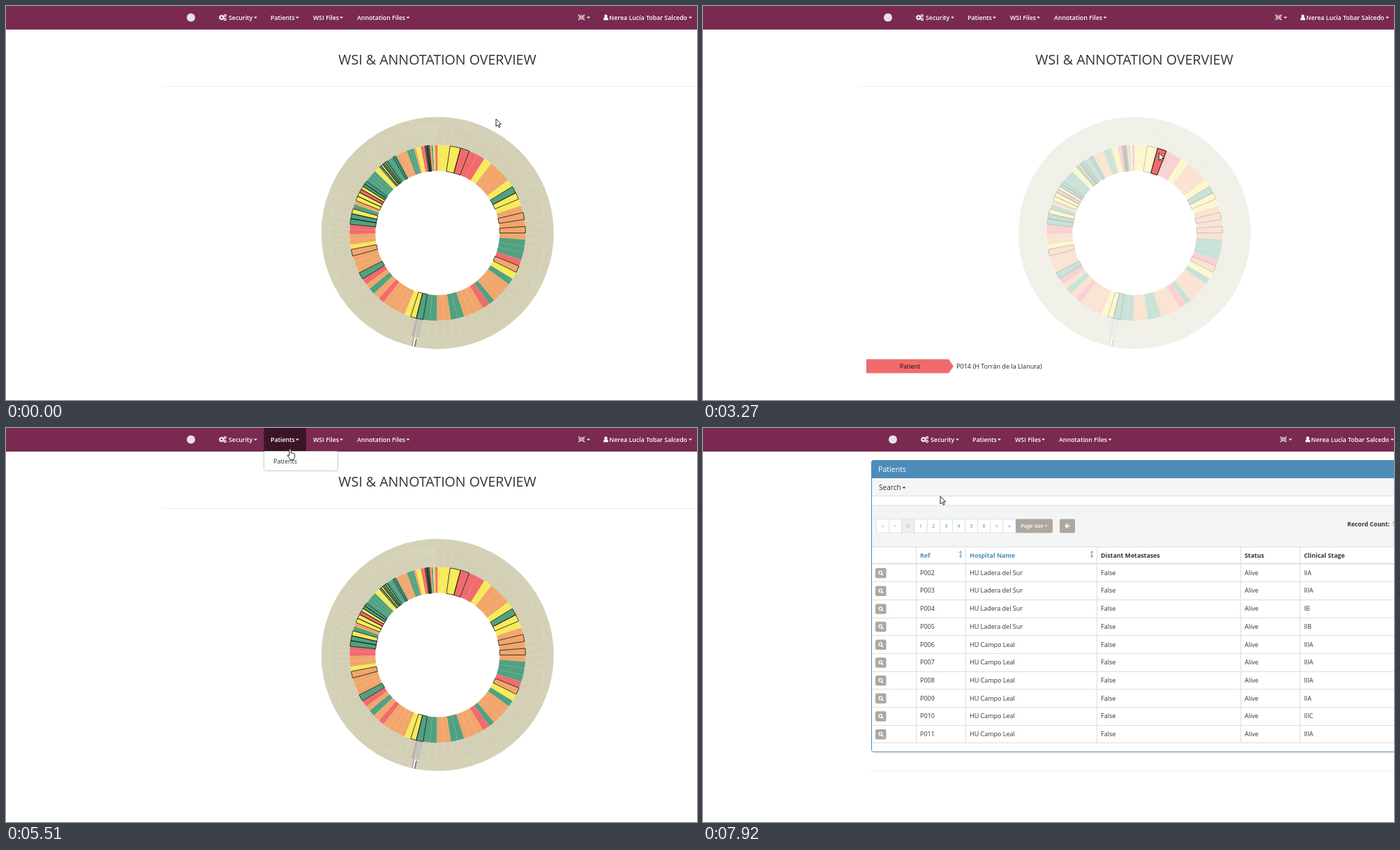
Recreate the animation shown at these times as an HTML page. Size 990 px wide and 565 px high, loop 7990 ms.

```html
<!DOCTYPE html>
<html lang="en">
<head>
<meta charset="utf-8">
<title>Annotation overview</title>
<style>
  html, body { margin: 0; width: 100%; height: 100%; overflow: hidden; background: #fff; }
  svg { display: block; width: 100%; height: 100%; }
  text { font-family: "Open Sans", "Noto Sans", sans-serif; font-size: 9px; fill: #333; white-space: pre; }
</style>
</head>
<body>
<svg id="stage" viewBox="0 0 990 565"></svg>
<script>
const LOOP = 7990;
const stage = document.getElementById("stage");

// ---- drawing helpers ----
function el(tag, attrs, parent) {
  const node = document.createElementNS("http://www.w3.org/2000/svg", tag);
  for (const key in attrs) node.setAttribute(key, attrs[key]);
  parent.appendChild(node);
  return node;
}
const group = (parent, attrs = {}) => el("g", attrs, parent);
const rect = (parent, x, y, width, height, fill, more = {}) =>
  el("rect", { x, y, width, height, fill, ...more }, parent);
const path = (parent, d, attrs) => el("path", { d, ...attrs }, parent);
const circle = (parent, cx, cy, r, attrs) => el("circle", { cx, cy, r, ...attrs }, parent);

function label(parent, str, x, y, { size = 9, fill = "#333", weight = 400, anchor = "start" } = {}) {
  const style = `font-size:${size}px;fill:${fill};font-weight:${weight}`;
  el("text", { x, y, style, "text-anchor": anchor }, parent).textContent = str;
}
const caret = (parent, x, y, fill, w = 5) =>
  path(parent, `M${x} ${y}h${w}l${-w / 2} ${w / 2}z`, { fill });
const show = (node, on) => node.setAttribute("visibility", on ? "visible" : "hidden");

// ---- navigation bar ----
const NAV = "#7a2950";

function navBar(parent, dx) {
  rect(parent, 0, 0, 990, 33.5, NAV);
  rect(parent, 0, 32.5, 990, 1, "#682044");
  const g = group(parent, { transform: `translate(${dx} 0)` });
  const active = rect(g, 369.5, 0, 60.5, 33, "#3c1428", { visibility: "hidden" });
  circle(g, 265, 16.5, 6, { fill: "#eadfe5" });

  const gear = { fill: "none", stroke: "#fff" };
  circle(g, 308.8, 16.5, 2.3, { ...gear, "stroke-width": 1.7 });
  circle(g, 308.8, 16.5, 3.5, { ...gear, "stroke-width": 1, "stroke-dasharray": "1.37 1.38" });
  for (const y of [13.8, 19.2]) circle(g, 313.9, y, 1.5, { ...gear, "stroke-width": 1.2 });

  const bold = { size: 8.8, fill: "#fff", weight: 600 };
  for (const [str, x, end] of [
    ["Security", 319, 355], ["Patients", 379, 415],
    ["WSI Files", 440, 478], ["Annotation Files", 503, 573.5]
  ]) {
    label(g, str, x, 20, bold);
    caret(g, end, 15.6, "#fff");
  }

  rect(g, 820, 12.5, 9, 7.5, "#4b3c5c");
  path(g, "M820 12.5l9 7.5M829 12.5l-9 7.5M824.5 12.5v7.5M820 16.2h9",
    { stroke: "#f3e6df", "stroke-width": 1.5 });
  path(g, "M824.5 12.5v7.5M820 16.2h9", { stroke: "#c8504e", "stroke-width": .8 });
  caret(g, 832, 15.6, "#fff");

  circle(g, 859.4, 14.4, 2.2, { fill: "#fff" });
  path(g, "M856 20.3v-1.6q0-2.4 2-2.5h2.8q2 .1 2 2.5v1.6z", { fill: "#fff" });
  label(g, "Nerea Lucía Tobar Salcedo", 976, 20, { ...bold, anchor: "end" });
  caret(g, 978, 15.6, "#fff");
  return active;
}

// ---- overview page ----
const CX = 618.3, CY = 325.5, R0 = 89, R1 = 126, R2 = 154, R3 = 166.5;
const COLORS = { y: "#f7ea5b", r: "#f06b6c", o: "#f1a66c", g: "#51a180" };
// colour letter (capital = outlined) and end angle in degrees from the top
const RING = "y8.2 Y15.2 R21.2 r32.2 y37.7 o53.2 y58.1 G62.8 Y67.3 y71.8 o76.5 O81.1 o85.7 O90 " +
  "o94.3 g107.8 r112.1 O116.6 y121.5 g125.8 o140 g143.9 r148.8 o162.4 g171.3 o180.5 g189.5 G194 " +
  "Y197.8 y202.1 o218 r221.9 o226.4 g230.7 o234.2 r238.5 G243 o254.8 O259.2 y262.4 o269.3 r275.7 " +
  "G279.4 G282.7 Y286 g289.1 o291.7 Y294.7 Y297.5 R299.9 Y302 G304 G306 g314.8 y318.7 G320 Y321.3 " +
  "G322.4 Y323.3 G325 g329.6 G331 g332.1 o339.5 g344.4 o345.7 y349 r351.8 G352.8 R353.6 G354.6 " +
  "o356 g357 y357.8 o358.6 r360";

function polar(a, r) {
  const t = a * Math.PI / 180;
  return `${(CX + r * Math.sin(t)).toFixed(2)} ${(CY - r * Math.cos(t)).toFixed(2)}`;
}
const spoke = (a, r0, r1) => `M${polar(a, r0)}L${polar(a, r1)}`;
const wedge = (a0, a1, r0, r1) =>
  `M${polar(a0, r0)}L${polar(a0, r1)}A${r1} ${r1} 0 0 1 ${polar(a1, r1)}` +
  `L${polar(a1, r0)}A${r0} ${r0} 0 0 0 ${polar(a0, r0)}z`;

// typical width of one patient, shrinking towards the end of the turn
const unit = a => a < 60 ? 5.3 : a < 240 ? 4.4 : 4.4 - (a - 240) * .029;

function drawChart(parent) {
  circle(parent, CX, CY, (R1 + R3) / 2,
    { fill: "none", stroke: "#d2cfb4", "stroke-width": R3 - R1 });
  const outlines = [];
  let inner = "", outer = "", from = 0;
  for (const item of RING.split(" ")) {
    const to = +item.slice(1), key = item[0].toLowerCase();
    path(parent, wedge(from, to, R0, R1), { fill: COLORS[key] });
    if (item[0] !== key) outlines.push(wedge(from, to, R0, R1));
    const n = Math.max(1, Math.round((to - from) / unit(from)));
    for (let i = 0; i < n; i++) {
      const a = from + (to - from) * i / n;
      if (i) inner += spoke(a, R0, R1);
      outer += spoke(a, R1, R2);
      if (a > 270) outer += spoke(a + .7, 142, R2);
    }
    from = to;
  }
  for (let a = 0; a < 360; a += 1.2) outer += spoke(a, R2, R3);
  path(parent, inner, { stroke: "#fff", "stroke-width": .5, opacity: .35 });
  path(parent, outer, { stroke: "#fff", "stroke-width": .5, opacity: .3 });
  circle(parent, CX, CY, R2, { fill: "none", stroke: "#fff", "stroke-width": .5, opacity: .3 });

  for (const [a0, a1, r0, r1, fill] of [
    [189.8, 193.3, R1, 152, "#bcc1b3"], [193.3, 194.1, R1, 153, "#c69fae"],
    [192.3, 193, 153, R3, "#d79aa5"], [191.6, 192.3, 153, R3, "#fff"],
    [191, 191.6, 155, R3, "#4f8f76"]
  ]) path(parent, wedge(a0, a1, r0, r1), { fill });
  path(parent, spoke(191, R1, 152) + spoke(192.2, R1, 152),
    { stroke: "#e4e2d6", "stroke-width": .5 });
  path(parent, outlines.join(""), { fill: "none", stroke: "#111", "stroke-width": .8 });
}

const overview = group(stage);
const activeTab = navBar(overview, 0);
label(overview, "WSI & ANNOTATION OVERVIEW", 618, 84, { size: 19.6, anchor: "middle" });
rect(overview, 224, 115, 766, 1, "#eee");
const chart = group(overview);
drawChart(chart);

const hover = group(overview);
path(hover, wedge(15.2, 21.2, R0, R1), { fill: COLORS.r, stroke: "#111", "stroke-width": 1 });
path(hover, "M234 506.5H352L359 516.5 352 526.5H234z", { fill: COLORS.r });
label(hover, "Patient", 296.5, 520, { fill: "#111", anchor: "middle" });
label(hover, "P014 (H Torrán de la Llanura)", 363, 520, { size: 9.1, fill: "#222" });

const menu = group(overview);
rect(menu, 369.5, 33.5, 106, 28, "#fff", { stroke: "#ccc", rx: 2 });
const menuItem = rect(menu, 370, 37.5, 105, 20, "#f0f0f0");
label(menu, "Patients", 383, 51);

// ---- patients page ----
const BLUE = "#4d8bb9", TAUPE = "#aea79f";
const list = group(stage);
navBar(list, 7);
rect(list, 241.5, 46.5, 780, 418, "#fff", { rx: 3, stroke: BLUE });
path(list, "M241 72V49.5q0-3 3-3H990V72z", { fill: BLUE });
label(list, "Patients", 251, 63, { size: 10.6, fill: "#fff" });
rect(list, 242, 72, 748, 25.5, "#f4f5f5");
rect(list, 242, 97, 748, 1, "#ddd");
label(list, "Search", 252, 88.5, { size: 10.1 });
caret(list, 285.5, 84.6, "#333");
rect(list, 242, 111, 748, 59, "#f3f5f4");
rect(list, 242, 110.5, 748, 1, "#ddd");

[..."«<0123456>»"].forEach((mark, i) => {
  const x = 248.5 + i * 18.15;
  rect(list, x, 130.5, 18.15, 19.5, i === 2 ? "#eee" : "#fff", { stroke: "#ddd", "stroke-width": .8 });
  label(list, mark, x + 9, 143, { size: 7.3, fill: i < 3 ? "#aaa" : BLUE, anchor: "middle" });
});
rect(list, 448, 130.5, 53, 20, TAUPE, { rx: 2 });
label(list, "Page size", 455.5, 143, { size: 7.3, fill: "#fff", weight: 600 });
caret(list, 489, 139.4, "#fff", 4.4);
rect(list, 511, 130.5, 22, 20, TAUPE, { rx: 2 });
path(list, "M526 140.5H519.5M522.6 137.3L519.4 140.5 522.6 143.7",
  { fill: "none", stroke: "#fff", "stroke-width": 1.6 });
label(list, "Record Count:", 923, 140.5, { size: 8.7, weight: 700 });
label(list, "1", 986.5, 140.5, { size: 8.8, fill: "#c98873" });

const ROW = 25.68, TOP = 194.5;
rect(list, 242, 170, 748, 281.5, "#fff");
rect(list, 242, 170, 748, 1, "#ddd");
rect(list, 242, 194, 748, 1.3, "#d4d4d4");
for (const x of [305, 376, 564, 770, 855]) rect(list, x, 170, 1, 281.5, "#ddd");
[["Ref", 311], ["Hospital Name", 382], ["Distant Metastases", 570], ["Status", 776], ["Clinical Stage", 861]]
  .forEach(([str, x], i) =>
    label(list, str, x, 186, { size: 8.8, weight: 700, fill: i < 2 ? BLUE : "#333" }));
for (const x of [369, 557])
  path(list, `M${x} 177v8M${x - 1.8} 178.6l1.8-2 1.8 2M${x - 1.8} 183.4l1.8 2 1.8-2`,
    { fill: "none", stroke: BLUE, "stroke-width": 1 });

"IIA IIIA IB IIB IIIA IIIA IIIA IIA IIIC IIIA".split(" ").forEach((stageName, i) => {
  const y = TOP + ROW * i, base = y + 16.3;
  rect(list, 242, Math.round(y + ROW), 748, 1, "#ddd");
  rect(list, 247, y + 6.3, 15.5, 14.5, TAUPE, { rx: 2 });
  circle(list, 254.3, y + 13, 2.3, { fill: "none", stroke: "#fff", "stroke-width": 1.3 });
  path(list, `M256 ${y + 14.7}l2.2 2.2`, { stroke: "#fff", "stroke-width": 1.5 });
  label(list, "P" + String(i + 2).padStart(3, "0"), 311, base);
  label(list, i < 4 ? "HU Ladera del Sur" : "HU Campo Leal", 382, base);
  label(list, "False", 570, base);
  label(list, "Alive", 776, base);
  label(list, stageName, 861, base);
});
rect(list, 241, 491, 749, 1, "#eee");

// ---- pointer ----
const pointer = group(stage);
const click = circle(pointer, 0, 0, 10, { fill: "#f5d800", opacity: .6 });
const ink = { fill: "#fff", stroke: "#111", "stroke-width": .9, "stroke-linejoin": "round" };
const arrow = path(pointer, "M0 0V10.8L2.5 8.5 4.2 12.3 6 11.5 4.3 7.8H7.6z", ink);
const hand = path(pointer,
  "M0 1a1.2 1.2 0 0 1 2.4 0V6l1.2-.4 1 .4h1.4l.8.6 1 .4V11q0 2-1.4 3.2v1.3H1.2V14Q-.5 12.5-2.8 9.2q.2-1.6 2.8.4z", ink);

const EASE = {
  linear: u => u,
  in: u => u ** 3,
  out: u => 1 - (1 - u) ** 2,
  both: u => u * u * (3 - 2 * u)
};
// start, end, steps, target x, target y, easing
const MOVES = [
  [0, 700, 9, 653, 212, "both"],
  [3193, 3500, 4, 673, 127, "in"],
  [3500, 4040, 7, 451, 106, "linear"],
  [4040, 4500, 6, 405, 25, "out"],
  [5425, 5680, 3, 408, 45, "both"],
  [7222, 7920, 9, 340, 98, "both"]
];

function pointerAt(t) {
  let x = 702, y = 162;
  for (const [t0, t1, n, tx, ty, ease] of MOVES) {
    if (t < t0) break;
    const step = Math.floor((t - t0) / (t1 - t0) * n + 1e-6);
    const u = EASE[ease](Math.min(1, step / n));
    x += (tx - x) * u;
    y += (ty - y) * u;
  }
  return [x, y];
}

function draw(t) {
  const within = (a, b) => t >= a && t < b;
  const [x, y] = pointerAt(t);
  const onList = t >= 6470;
  const menuOpen = within(5050, 6220);
  const onTab = t < 6220 && y < 33 && x > 370 && x < 430;
  const hovering = within(233, 3500);

  overview.style.display = onList ? "none" : "";
  list.style.display = onList ? "" : "none";
  chart.setAttribute("opacity", hovering ? .3 : 1);
  show(hover, hovering);
  show(activeTab, onTab || menuOpen);
  show(menu, menuOpen);
  show(menuItem, menuOpen && y > 36);

  pointer.setAttribute("transform", `translate(${x.toFixed(1)} ${y.toFixed(1)})`);
  const pointing = onTab || menuOpen;
  show(hand, pointing);
  show(arrow, !pointing);
  show(click, within(4820, 5050) || within(5980, 6220));
}

const start = performance.now();
function tick() {
  draw((performance.now() - start) % LOOP);
  requestAnimationFrame(tick);
}
tick();
</script>
</body>
</html>
```
